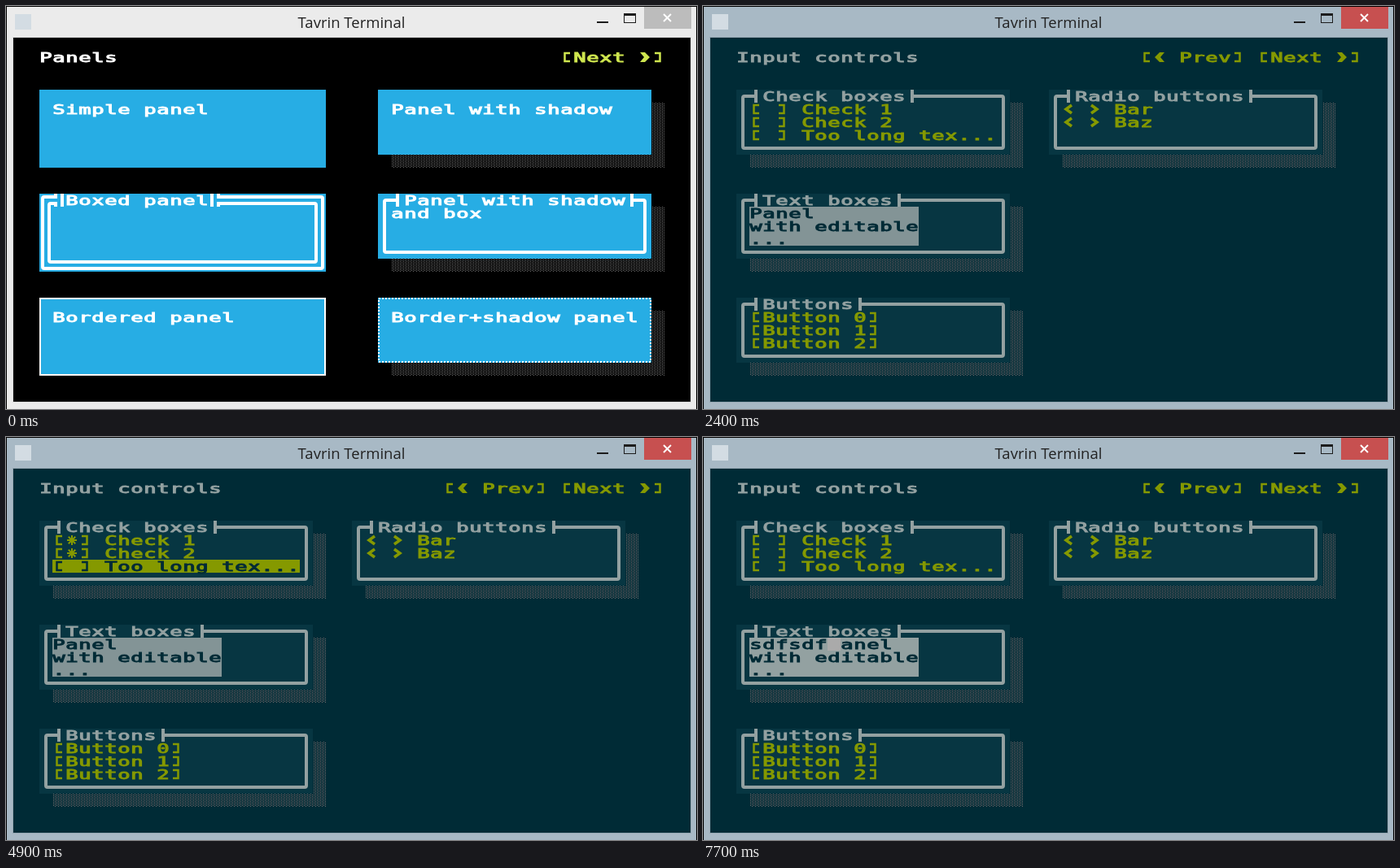
Write an HTML page with a canvas that moves like this. It is 849 by 496 pixels and loops after 8 s.

```html
<!DOCTYPE html>
<html lang="en">
<head>
<meta charset="utf-8">
<title>Tavrin Terminal</title>
<style>
  html, body { margin: 0; width: 100%; height: 100%; overflow: hidden; background: #000; }
  canvas { display: block; }
</style>
</head>
<body>
<canvas id="stage" width="849" height="496"></canvas>
<script>
const ctx = document.getElementById('stage').getContext('2d');
const LOOP = 8000;
const CELL = 16;
const WIDE = 1.7; // aspect of the square-cell terminal face

const DARK = { back: '#000', panel: '#27ade4', text: '#fff', accent: '#cfe64f', shade: '#6c6c6c' };
const TEAL = { back: '#002b36', panel: '#073642', text: '#93a1a1', accent: '#859900', shade: '#707070' };

const CHECKS = ['Check 1', 'Check 2', 'Too long tex...'];

// [time, change] pairs; later entries override earlier ones
const EVENTS = [
  [500, { nextHot: true }],
  [1300, { active: true }],
  [1400, { page: 2, nextHot: false, prevHot: true }],
  [2400, { prevHot: false }],
  [3400, { hover: 2 }],
  [3500, { hover: 1 }],
  [4000, { mark1: true }],
  [4200, { hover: 0 }],
  [4300, { mark0: true }],
  [4600, { hover: -1 }],
  [4700, { hover: 1 }],
  [4900, { hover: 2 }],
  [5200, { mark2: true }],
  [5300, { hover: 1, mark1: false }],
  [5700, { hover: 0 }],
  [6000, { mark0: false }],
  [6100, { hover: 2 }],
  [6300, { mark2: false }],
  [6500, { hover: -1 }],
  [6800, { editing: true, cursor: true }],
  [7200, { typed: 2 }],
  [7300, { typed: 3 }],
  [7400, { typed: 5 }],
  [7500, { typed: 6, cursor: false }],
  [7700, { cursor: true }]
];

function stateAt(time) {
  const state = { page: 1, hover: -1, typed: 0 };
  for (const [start, change] of EVENTS) {
    if (time >= start) Object.assign(state, change);
  }
  return state;
}

function rect(x, y, w, h, color) {
  ctx.fillStyle = color;
  ctx.fillRect(x, y, w, h);
}

function line(points, color, width) {
  ctx.strokeStyle = color;
  ctx.lineWidth = width;
  ctx.beginPath();
  points.forEach(([x, y]) => ctx.lineTo(x, y));
  ctx.stroke();
}

function arrow(x, y, dir, color) {
  ctx.fillStyle = color;
  ctx.beginPath();
  for (const [px, py] of [[-6, -6], [0, -6], [6, 0], [0, 6], [-6, 6], [-1, 0]]) {
    ctx.lineTo(x + 8 + px * dir, y + 8 + py);
  }
  ctx.fill();
}

function chevron(x, y, dir, color) {
  const back = x + 8 - 4 * dir;
  line([[back, y + 3], [x + 8 + 3 * dir, y + 8], [back, y + 13]], color, 3.5);
}

function bracket(x, y, dir, color) {
  const stem = x + 8 - 2.5 * dir, tip = x + 8 + 4 * dir;
  line([[tip, y + 3], [stem, y + 3], [stem, y + 13], [tip, y + 13]], color, 2.5);
}

function star(x, y, color) {
  for (let i = 0; i < 4; i++) {
    const a = i * Math.PI / 4;
    const dx = 6 * Math.cos(a), dy = 6 * Math.sin(a);
    line([[x + 8 - dx, y + 8 - dy], [x + 8 + dx, y + 8 + dy]], color, 2);
  }
}

const GLYPHS = {
  '«': (x, y, c) => arrow(x, y, -1, c),
  '»': (x, y, c) => arrow(x, y, 1, c),
  '<': (x, y, c) => chevron(x, y, -1, c),
  '>': (x, y, c) => chevron(x, y, 1, c),
  '[': (x, y, c) => bracket(x, y, 1, c),
  ']': (x, y, c) => bracket(x, y, -1, c),
  '*': star
};

function text(str, x, y, color) {
  ctx.font = '15px "DejaVu Sans Mono", monospace';
  ctx.textAlign = 'center';
  ctx.textBaseline = 'alphabetic';
  [...str].forEach((ch, i) => {
    const left = x + i * CELL;
    if (GLYPHS[ch]) return GLYPHS[ch](left, y, color);
    ctx.save();
    ctx.translate(left + 8, y + 13.5);
    ctx.scale(WIDE, 1);
    ctx.fillStyle = ctx.strokeStyle = color;
    ctx.lineWidth = 0.9;
    ctx.lineJoin = 'miter';
    ctx.miterLimit = 2;
    ctx.fillText(ch, 0, 0);
    ctx.strokeText(ch, 0, 0);
    ctx.restore();
  });
}

function button(str, x, y, theme, hot) {
  if (hot) rect(x, y, str.length * CELL, CELL, theme.accent);
  text(str, x, y, hot ? theme.back : theme.accent);
}

function shadow(x, y, w, h, theme) {
  const tile = document.createElement('canvas');
  tile.width = 4;
  tile.height = 2;
  const t = tile.getContext('2d');
  t.fillStyle = theme.shade;
  t.fillRect(0, 0, 1, 1);
  t.fillRect(2, 1, 1, 1);
  ctx.fillStyle = ctx.createPattern(tile, 'repeat');
  ctx.fillRect(x + CELL, y + CELL, w, h);
}

function panel(x, y, w, h, theme, shaded) {
  if (shaded) shadow(x, y, w, h, theme);
  rect(x, y, w, h, theme.panel);
}

function frame(x, y, w, h, inset, color) {
  ctx.lineWidth = 4;
  ctx.strokeStyle = color;
  ctx.beginPath();
  ctx.roundRect(x + inset, y + inset, w - 2 * inset, h - 2 * inset, 2);
  ctx.stroke();
}

function titledBox(title, x, y, w, h, theme) {
  panel(x, y, w, h, theme, true);
  frame(x, y, w, h, 8, theme.text);
  const end = x + 32 + title.length * CELL;
  rect(x + 22, y, end + 10 - x - 22, CELL, theme.panel);
  rect(x + 22, y, 4, CELL, theme.text);
  rect(end + 6, y, 4, CELL, theme.text);
  text(title, x + 32, y, theme.text);
}

function doubleBox(title, x, y, w, h, theme) {
  panel(x, y, w, h, theme, false);
  frame(x, y, w, h, 4, theme.text);
  frame(x, y, w, h, 12, theme.text);
  const end = x + 32 + title.length * CELL;
  rect(x + 22, y, end - x - 12, CELL, theme.panel);
  rect(x + 26, y, 4, CELL, theme.text);
  rect(end + 2, y, 4, CELL, theme.text);
  for (const left of [x + 18, end + 10]) {
    rect(left, y, 4, 6, theme.text);
    rect(left, y + 10, 4, 6, theme.text);
  }
  text(title, x + 32, y, theme.text);
}

function caption(active) {
  rect(0, 0, 849, 496, '#000');
  rect(1, 1, 847, 495, active ? '#a8b9c5' : '#ebebeb');
  rect(8, 38, 834, 450, active ? '#93a3ae' : '#d8d8d8');
  rect(11, 10, 20, 19, '#d3dce3');

  ctx.font = '18.5px "Open Sans", "Noto Sans", sans-serif';
  ctx.textAlign = 'center';
  ctx.textBaseline = 'alphabetic';
  ctx.fillStyle = '#222';
  ctx.fillText('Tavrin Terminal', 424.5, 27);

  const ink = '#1c1c1c';
  rect(726, 19, 14, 2, ink);
  ctx.strokeStyle = ink;
  ctx.lineWidth = 1;
  ctx.strokeRect(759.5, 9.5, 14, 11);
  rect(759, 9, 15, 3, ink);

  rect(784, 1, 58, 27, active ? '#c75050' : '#bcbcbc');
  line([[808, 10], [817, 19]], '#fff', 2);
  line([[817, 10], [808, 19]], '#fff', 2);
}

function panelsPage(s) {
  const c = DARK;
  text('Panels', 41, 55, c.text);
  button('[Next »]', 681, 55, c, s.nextHot);

  panel(41, 103, 352, 96, c, false);
  text('Simple panel', 57, 119, c.text);

  panel(457, 103, 336, 80, c, true);
  text('Panel with shadow', 473, 119, c.text);

  doubleBox('Boxed panel', 41, 231, 352, 96, c);

  titledBox('Panel with shadow', 457, 231, 336, 80, c);
  text('and box', 473, 247, c.text);

  panel(41, 359, 352, 96, c, false);
  ctx.strokeStyle = c.text;
  ctx.lineWidth = 2;
  ctx.strokeRect(42, 360, 350, 94);
  text('Bordered panel', 57, 375, c.text);

  panel(457, 359, 336, 80, c, true);
  ctx.strokeStyle = c.text;
  ctx.lineWidth = 2;
  ctx.setLineDash([2, 2]);
  ctx.strokeRect(458, 360, 334, 78);
  ctx.setLineDash([]);
  text('Border+shadow panel', 473, 375, c.text);
}

function textBox(s) {
  const x = 57, y = 247;
  const typed = 'sdfsdf'.slice(0, s.typed);
  rect(x, y, 13 * CELL, 3 * CELL, s.editing ? '#93a1a1' : '#839496');
  [typed + 'Panel', 'with editable', '...'].forEach((row, i) => text(row, x, y + i * CELL, TEAL.back));
  if (s.cursor) rect(x + s.typed * CELL, y, CELL, CELL, '#aaa');
}

function controlsPage(s) {
  const c = TEAL;
  text('Input controls', 41, 55, c.text);
  button('[« Prev]', 537, 55, c, s.prevHot);
  button('[Next »]', 681, 55, c, false);

  titledBox('Check boxes', 41, 103, 336, 80, c);
  CHECKS.forEach((label, i) => {
    const mark = s['mark' + i] ? '*' : ' ';
    button(`[${mark}] ${label}`, 57, 119 + i * CELL, c, s.hover === i);
  });

  titledBox('Radio buttons', 425, 103, 336, 80, c);
  ['Bar', 'Baz'].forEach((label, i) => button('< > ' + label, 441, 119 + i * CELL, c, false));

  titledBox('Text boxes', 41, 231, 336, 80, c);
  textBox(s);

  titledBox('Buttons', 41, 359, 336, 80, c);
  for (let i = 0; i < 3; i++) button(`[Button ${i}]`, 57, 375 + i * CELL, c, false);
}

function draw(time) {
  const s = stateAt(time);
  caption(s.active);
  rect(9, 39, 832, 448, (s.page === 1 ? DARK : TEAL).back);
  if (s.page === 1) panelsPage(s);
  else controlsPage(s);
}

const start = performance.now();
function tick() {
  draw((performance.now() - start) % LOOP);
  requestAnimationFrame(tick);
}
tick();
</script>
</body>
</html>
```
